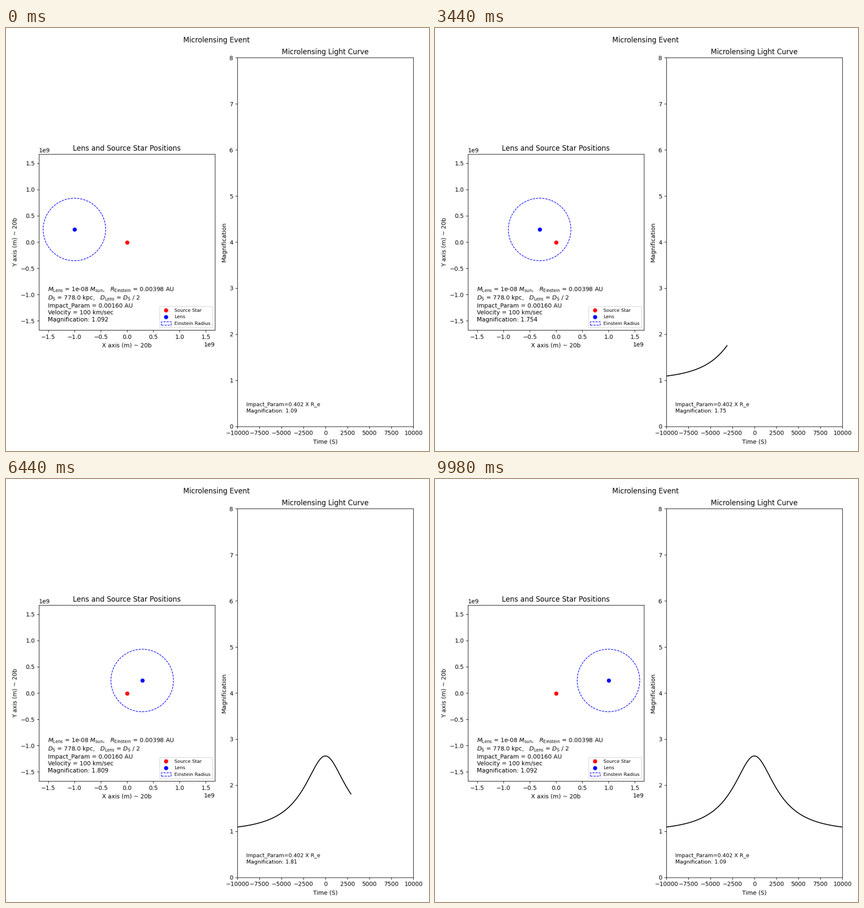
Write a matplotlib script that moves like this. It is 748 px wide and 748 px high and loops after 10000 ms.

```python
import numpy as np
import matplotlib.pyplot as plt
from matplotlib.animation import FuncAnimation

SIZE = 748
LAYOUT_DPI = 100
INCHES = 10
FRAMES = 500
INTERVAL = 20

AU = 1.495979e11
R_EINSTEIN = 5.951e8
IMPACT = 0.0016 * AU
VELOCITY = 1e5
LIMIT = 1.675e9

times = np.linspace(-10000, 10000, FRAMES)
lens_x = VELOCITY * times
u = np.hypot(lens_x, IMPACT) / R_EINSTEIN
magnification = (u**2 + 2) / (u * np.sqrt(u**2 + 4))


def shrink(image, size):
    """Scale a square image down by averaging the area under each pixel."""
    count = len(image)
    edges = np.linspace(0, count, size + 1)[:, None]
    cells = np.arange(count)
    overlap = np.minimum(edges[1:], cells + 1) - np.maximum(edges[:-1], cells)
    weights = np.clip(overlap, 0, None) * size / count
    layers = [weights @ image[..., k] @ weights.T for k in range(3)]
    return np.clip(np.rint(np.dstack(layers)), 0, 255).astype(np.uint8)


plt.rcParams["font.family"] = "DejaVu Sans"
fig, (sky, light) = plt.subplots(1, 2, figsize=(INCHES, INCHES),
                                 dpi=SIZE / INCHES)
title = fig.suptitle("Microlensing Event", x=0.4978)

# Lens and source panel
sky_ticks = np.arange(-3, 4) * 0.5e9
sky.set(title="Lens and Source Star Positions",
        xlabel="X axis (m) ~ 20b", ylabel="Y axis (m) ~ 20b",
        xlim=(-LIMIT, LIMIT), ylim=(-LIMIT, LIMIT),
        xticks=sky_ticks, yticks=sky_ticks, aspect="equal")

source, = sky.plot([0], [0], "ro", label="Source Star")
lens, = sky.plot([lens_x[0]], [IMPACT], "bo", label="Lens")
ring = plt.Circle((lens_x[0], IMPACT), R_EINSTEIN, color="b", fill=False,
                  linestyle="--", label="Einstein Radius")
sky.add_patch(ring)
sky.legend(loc="lower right", fontsize=8)

# The empty last line leaves room for the changing value.
facts = [
    r"$M_{\mathrm{Lens}}$ = 1e-08 $M_{\mathrm{sun}}$,"
    r"   $R_{\mathrm{Einstein}}$ = 0.00398 AU",
    r"$D_{\mathrm{S}}$ = 778.0 kpc,"
    r"   $D_{\mathrm{Lens}}$ = $D_{\mathrm{S}}$ / 2",
    "Impact_Param = 0.00160 AU",
    "Velocity = 100 km/sec",
    "",
]
sky.text(0.05, 0.05, "\n".join(facts), fontsize=10, transform=sky.transAxes)
sky_value = sky.text(0.05, 0.05, "", fontsize=10, transform=sky.transAxes)

# Light curve panel
light.set(title="Microlensing Light Curve",
          xlabel="Time (S)", ylabel="Magnification",
          xlim=(-10000, 10000), ylim=(0, 8),
          xticks=np.arange(-10000, 10001, 2500), yticks=np.arange(9))
curve, = light.plot([], [], "k-", linewidth=1.5)
light.text(-9000, 0.3, "Impact_Param=0.402 X R_e\n", fontsize=9)
light_value = light.text(-9000, 0.3, "", fontsize=9)

# Draw the fixed parts once, larger, and reuse them as the backdrop.
moving = [source, lens, ring, sky_value, curve, light_value]
fig.set_dpi(LAYOUT_DPI)
fig.tight_layout()
for artist in moving:
    artist.set_visible(False)
fig.canvas.draw()
backdrop = shrink(np.array(fig.canvas.buffer_rgba(), dtype=float), SIZE)
fig.set_dpi(SIZE / INCHES)

title.set_visible(False)
for ax in (sky, light):
    for artist in ax.get_children():
        artist.set_visible(artist in moving)
fig.figimage(backdrop, zorder=-1)


def update(i):
    lens.set_data([lens_x[i]], [IMPACT])
    ring.center = (lens_x[i], IMPACT)
    curve.set_data(times[:i + 1], magnification[:i + 1])
    sky_value.set_text(f"Magnification: {magnification[i]:.3f}")
    light_value.set_text(f"Magnification: {magnification[i]:.2f}")
    return moving


anim = FuncAnimation(fig, update, frames=FRAMES, interval=INTERVAL,
                     repeat=True, repeat_delay=0)
plt.show()
```
